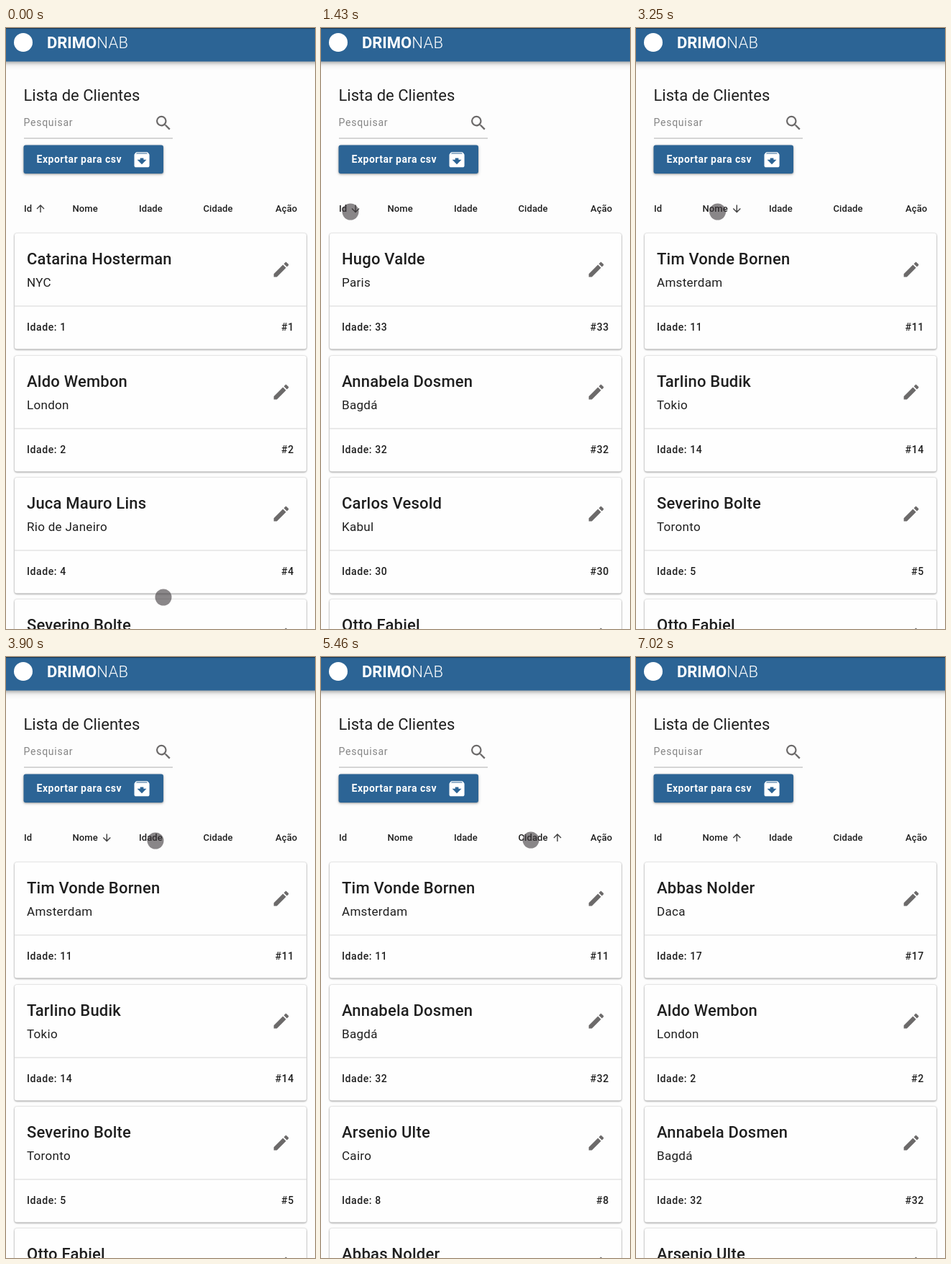
These frames come from a looping animation (430 by 834 pixels, 7.54 s). An HTML page:

```html
<!DOCTYPE html>
<html lang="pt">
<head>
<meta charset="utf-8">
<title>Lista de Clientes</title>
<style>
html, body { margin: 0; width: 100%; height: 100%; overflow: hidden; background: #fdfdfd; }
svg { display: block; }
text { font-family: Roboto, "Noto Sans", sans-serif; fill: #1f1f1f; white-space: pre; }
.bar { fill: #2c6495; filter: drop-shadow(0 2px 2px rgba(0,0,0,.22)) drop-shadow(0 3px 4px rgba(0,0,0,.16)); }
.brand { font-size: 22px; fill: #fff; }
.title { font-size: 22px; }
.hint { font-size: 14px; letter-spacing: .75px; fill: #858585; }
.button { fill: #2c6495; filter: drop-shadow(0 1.5px 1px rgba(0,0,0,.26)) drop-shadow(0 1px 2px rgba(0,0,0,.18)); }
.label { font-size: 14px; font-weight: 700; letter-spacing: .5px; fill: #fff; }
.head { font-size: 13px; font-weight: 500; letter-spacing: .1px; }
.card { fill: #fefefe; filter: drop-shadow(0 1px .8px rgba(0,0,0,.32)) drop-shadow(0 .5px 1.3px rgba(0,0,0,.2)); }
.name { font-size: 22px; font-weight: 500; letter-spacing: .2px; }
.city { font-size: 17px; letter-spacing: .3px; }
.info { font-size: 14px; font-weight: 500; letter-spacing: .6px; }
.icon { fill: #6c6a6a; }
.arrow { fill: none; stroke: #3f3f3f; stroke-width: 1.4; }
</style>
</head>
<body>
<svg width="430" height="834" viewBox="0 0 430 834">
  <defs>
    <path id="pencil" d="M3 17.25V21h3.75L17.81 9.94l-3.75-3.75L3 17.25zM20.71 7.04c.39-.39.39-1.02 0-1.41l-2.34-2.34c-.39-.39-1.02-.39-1.41 0l-1.83 1.83 3.75 3.75 1.83-1.83z"/>
  </defs>

  <rect class="bar" x="-20" y="-20" width="470" height="66.5"/>
  <rect width="430" height="1.2" fill="#1c3a55"/>
  <circle cx="24" cy="20" r="13" fill="#fff"/>
  <text class="brand" x="57" y="28"><tspan font-weight="700">DRIMO</tspan><tspan font-weight="300" letter-spacing=".4">NAB</tspan></text>

  <text class="title" x="24.5" y="101">Lista de Clientes</text>
  <text class="hint" x="24.5" y="136">Pesquisar</text>
  <path class="icon" transform="translate(205.6 118.4) scale(1.125)" d="M15.5 14h-.79l-.28-.27A6.47 6.47 0 0 0 16 9.5 6.5 6.5 0 1 0 9.5 16c1.61 0 3.09-.59 4.23-1.57l.27.28v.79l5 4.99L20.49 19l-4.99-5zm-6 0C7.01 14 5 11.99 5 9.5S7.01 5 9.5 5 14 7.01 14 9.5 11.99 14 9.5 14z"/>
  <rect x="25" y="152.3" width="207" height="1.5" fill="#c9c9c9"/>

  <rect class="button" x="24.5" y="162.5" width="194.5" height="39.5" rx="3"/>
  <text class="label" x="42.5" y="186.5">Exportar para csv</text>
  <path fill="#fff" transform="translate(175 168.7) scale(1.17)" d="M20.54 5.23l-1.39-1.68C18.88 3.21 18.47 3 18 3H6c-.47 0-.88.21-1.16.55L3.46 5.23C3.17 5.57 3 6.02 3 6.5V19c0 1.1.9 2 2 2h14c1.1 0 2-.9 2-2V6.5c0-.48-.17-.93-.46-1.27zM12 17.5L6.5 12H10v-2h4v2h3.5L12 17.5zM5.12 5l.81-1h12l.94 1H5.12z"/>

  <g class="head">
    <text x="25" y="255">Id</text>
    <text x="92.5" y="255">Nome</text>
    <text x="185" y="255">Idade</text>
    <text x="274.5" y="255">Cidade</text>
    <text x="375" y="255">Ação</text>
  </g>
  <path id="arrow" class="arrow" d="M0 5.3V-4.6M-5 .3L0 -4.7L5 .3"/>
  <g id="cards"></g>
  <circle id="cursor" r="11.5" fill="rgb(60,55,58)" fill-opacity=".6"/>
</svg>

<script>
const LOOP = 7540, STEP = 130, TURN = 107;

// id, name, city, sort weight of the age column
const clients = [
  [1, 'Catarina Hosterman', 'NYC', 5],
  [2, 'Aldo Wembon', 'London', 8],
  [4, 'Juca Mauro Lins', 'Rio de Janeiro', 3],
  [5, 'Severino Bolte', 'Toronto', 7],
  [8, 'Arsenio Ulte', 'Cairo', 2],
  [11, 'Tim Vonde Bornen', 'Amsterdam', 4],
  [14, 'Tarlino Budik', 'Tokio', 12],
  [17, 'Abbas Nolder', 'Daca', 13],
  [23, 'Elisa Trebe', 'Katmandu', 11],
  [29, 'Otto Fabiel', 'Lima', 10],
  [30, 'Carlos Vesold', 'Kabul', 6],
  [32, 'Annabela Dosmen', 'Bagdá', 9],
  [33, 'Hugo Valde', 'Paris', 1]
].map(([id, name, city, age]) => ({ id, name, city, age }));

const arrowX = { id: 48, name: 140.3, age: 230, city: 329 };

// time, column, direction (0 clears the sorting)
const sorts = [
  [-999, 'id', 1], [1000, 'id', -1],
  [2040, 'name', 1], [2700, 'name', -1],
  [3920, 'age', 1], [4500, 'age', -1],
  [5240, 'city', 1], [5500, 'city', -1], [5900, 'city', 0],
  [6330, 'name', 1]
];

// time, x, y
const path = [
  [0, 219, 790], [780, 41, 255], [1560, 41, 255], [1950, 106, 255],
  [3120, 106, 255], [3900, 208, 255], [4550, 208, 255], [4940, 292, 254],
  [5850, 292, 254], [5980, 182, 249], [6240, 106, 255], [6630, 106, 255],
  [7020, 150, 850], [LOOP, 150, 850]
];

const el = id => document.getElementById(id);

function cardMarkup(c, i) {
  return `<g transform="translate(0 ${285 + Math.ceil(i * 169.3)})">
    <rect class="card" x="12" width="406" height="160.5" rx="3"/>
    <rect x="12" y="100.3" width="406" height="1.2" fill="#dedede"/>
    <text class="name" x="29" y="43">${c.name}</text>
    <text class="city" x="29" y="73.6">${c.city}</text>
    <use href="#pencil" class="icon" transform="translate(369.2 36.4) scale(1.15)"/>
    <text class="info" x="29" y="135">Idade: ${c.id}</text>
    <text class="info" x="400.8" y="135" text-anchor="end">#${c.id}</text>
  </g>`;
}

function drawCards(col, dir) {
  const key = dir ? col : 'id', sign = dir || 1;
  const rows = [...clients].sort((a, b) => (a[key] < b[key] ? -1 : 1) * sign);
  el('cards').innerHTML = rows.slice(0, 4).map(cardMarkup).join('');
}

function drawArrow(t, n) {
  const [start, col, dir] = sorts[n];
  const p = Math.min((t - start) / TURN, 1);
  let angle = 0, alpha = 1;
  if (dir === 0) { angle = 180 * (1 - p); alpha = 1 - p * p; }
  else if (dir < 0) angle = 180 * p;
  else alpha = p;
  el('arrow').setAttribute('transform', `translate(${arrowX[col]} 250.8) rotate(${angle})`);
  el('arrow').setAttribute('opacity', alpha);
}

function drawCursor(t) {
  const i = path.findIndex(k => k[0] > t);
  const [t0, x0, y0] = path[i - 1], [t1, x1, y1] = path[i];
  const p = (t - t0) / (t1 - t0), e = p * p * (3 - 2 * p);
  el('cursor').setAttribute('cx', x0 + (x1 - x0) * e);
  el('cursor').setAttribute('cy', y0 + (y1 - y0) * e);
}

let shownStep = -1, shownSort = -1;

function tick() {
  const t = Math.floor((performance.now() % LOOP) / STEP) * STEP;
  if (t !== shownStep) {
    shownStep = t;
    const n = sorts.filter(s => s[0] <= t).length - 1;
    if (n !== shownSort) {
      shownSort = n;
      drawCards(sorts[n][1], sorts[n][2]);
    }
    drawArrow(t, n);
    drawCursor(t);
  }
  requestAnimationFrame(tick);
}
tick();
</script>
</body>
</html>
```
